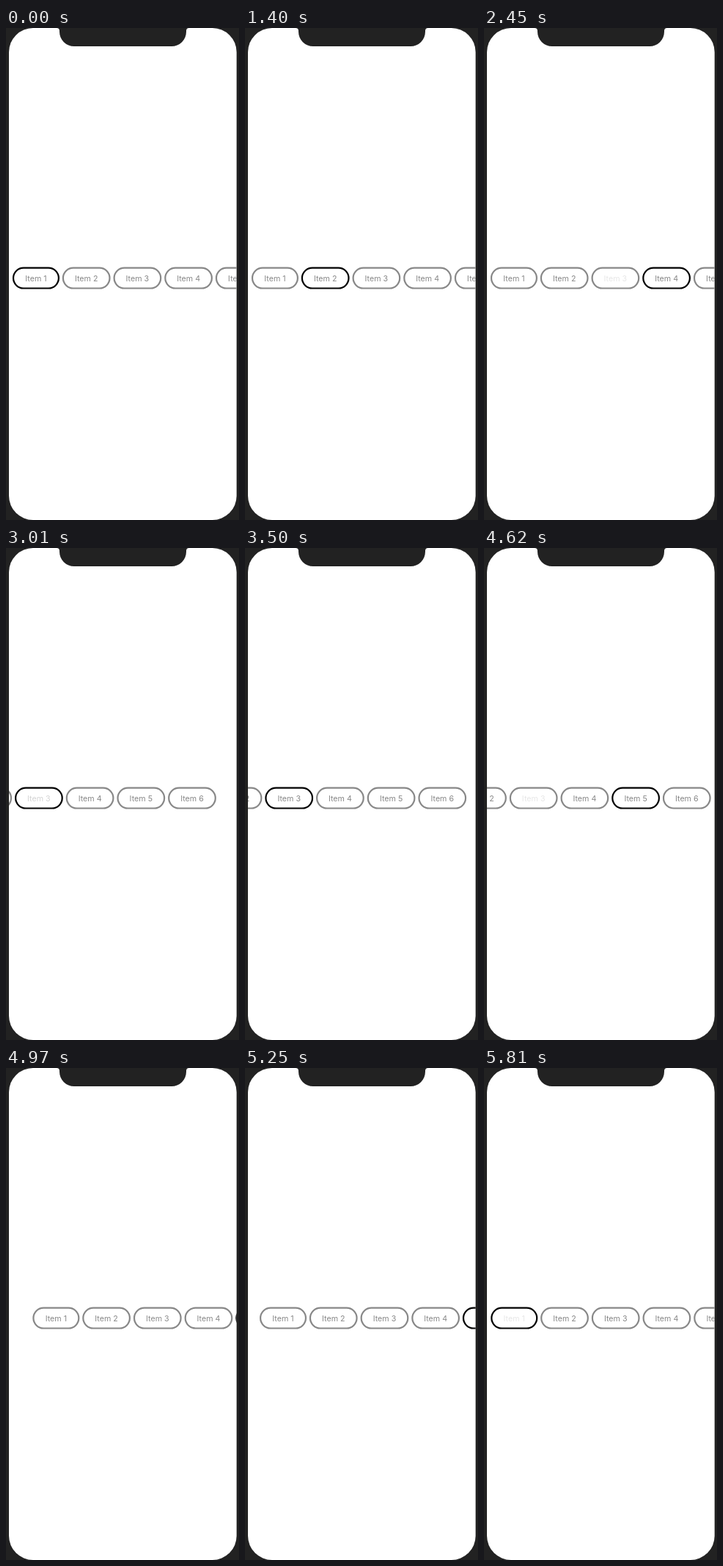
Recreate the animation shown at these times as an HTML page. Size 318x672 px, loop 5.88 s.

```html
<!DOCTYPE html>
<html lang="en">
<head>
<meta charset="utf-8">
<title>Item picker</title>
<style>
  html, body { margin: 0; height: 100%; overflow: hidden; background: #222; }
  svg { display: block; width: 100vw; height: 100vh; }
  text { font: 10.7px Inter, Roboto, sans-serif; text-anchor: middle; fill: #888; }
  .pill { fill: none; stroke-width: 2.2; }
</style>
</head>
<body>
<svg viewBox="0 0 318 672">
  <clipPath id="screen"><rect x="4" width="310.7" height="672" rx="33"/></clipPath>
  <rect width="318" height="672" fill="#222"/>
  <g clip-path="url(#screen)">
    <rect width="318" height="672" fill="#fff"/>
    <g id="list"></g>
  </g>
  <path fill="#222" d="M69 0Q73 0 73 4V5A20 20 0 0 0 93 25H226A20 20 0 0 0 246 5V4Q246 0 250 0Z"/>
</svg>
<script>
const LOOP = 5880, MAX_SCROLL = 111.7, OVERSHOOT = 27.4;
// [time, selected item]
const selections = [[0, 1], [980, 2], [2100, 4], [2520, 3], [4270, 5], [5810, 1]];
// [item, press, release]
const touches = [[2, 980, 1010], [4, 1960, 2100], [3, 2450, 2540], [3, 2940, 2940],
                 [5, 4130, 4270], [3, 4620, 4760], [1, 5810, 5880]];
const list = document.getElementById('list');

function add(name, attrs) {
  const el = document.createElementNS('http://www.w3.org/2000/svg', name);
  for (const key in attrs) el.setAttribute(key, attrs[key]);
  return list.appendChild(el);
}

const items = [1, 2, 3, 4, 5, 6].map(n => {
  const x = n === 1 ? 8.9 : 76.8 + (n - 2) * 69.7;
  const w = n === 1 ? 64.1 : 65.8;
  const pill = add('rect', { class: 'pill', x: x + 1.1, y: 327.6, width: w - 2.2, height: 27.9, rx: 13.95 });
  const label = add('text', { x: x + w / 2, y: 345.7 });
  label.textContent = 'Item ' + n;
  return { n, pill, label };
});

// Distance travelled by a flick: fast start, overshoot, spring back to rest
function flick(t) {
  const rise = 275;
  if (t <= 0) return 0;
  if (t < rise) return (MAX_SCROLL + OVERSHOOT) * (1 - (1 - t / rise) ** 7);
  const s = (t - rise) * 0.008;
  return MAX_SCROLL + OVERSHOOT * (1 + s) * Math.exp(-s);
}

function opacity(n, t) {
  const touch = touches.filter(([item, press]) => item === n && press <= t).pop();
  if (!touch) return 1;
  const p = Math.min(1, Math.max(0, (t - touch[2]) / 250));
  return 0.2 + 0.8 * p * p * (3 - 2 * p);
}

function draw(now) {
  const t = now % LOOP;
  const selected = selections.filter(s => s[0] <= t).pop()[1];
  list.setAttribute('transform', `translate(${flick(t - 4725) - flick(t - 2905)})`);
  for (const { n, pill, label } of items) {
    pill.setAttribute('stroke', n === selected ? '#000' : '#888');
    label.setAttribute('opacity', opacity(n, t));
  }
}

const start = performance.now();
function tick() {
  draw(performance.now() - start);
  requestAnimationFrame(tick);
}
tick();
</script>
</body>
</html>
```
